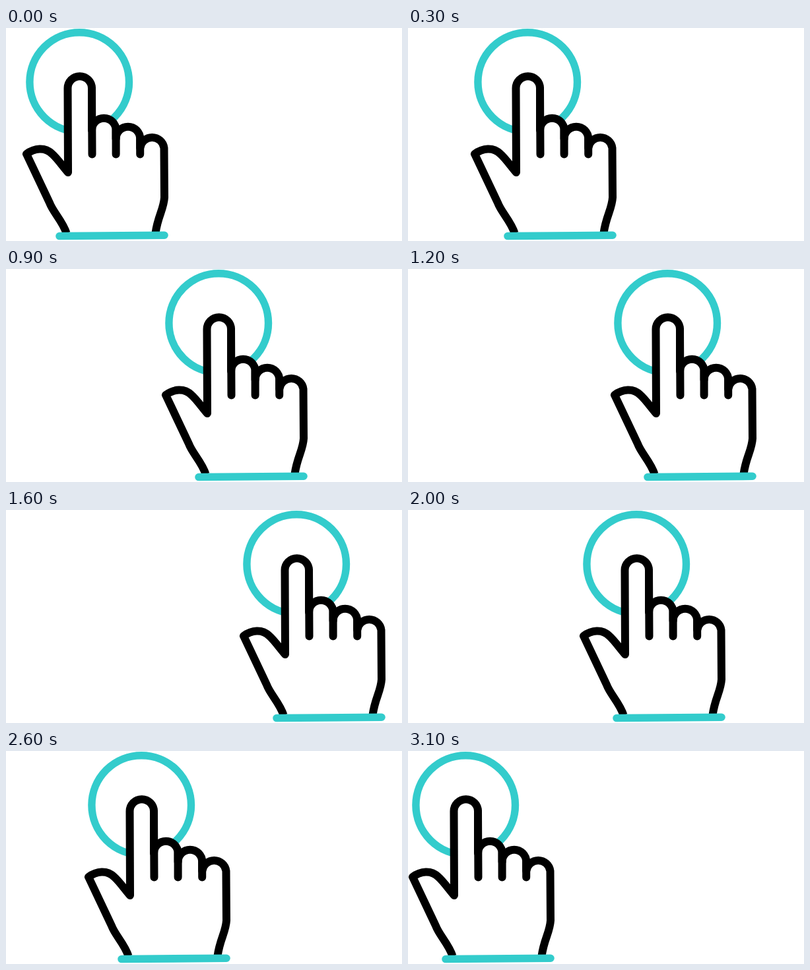
Animation, 600 px wide and 323 px high, one loop 3.2 s. Source, as an HTML page:

```html
<!DOCTYPE html>
<html lang="en">
<head>
<meta charset="utf-8">
<title>Sliding hand</title>
<style>
  html, body { margin: 0; width: 100%; height: 100%; overflow: hidden; background: #fff; }
  svg { display: block; width: 100%; height: 100%; }
</style>
</head>
<body>
<svg viewBox="0 0 600 323" fill="none" stroke-linejoin="round">
  <g id="hand">
    <circle cx="111.2" cy="82" r="75.3" stroke="#33cccc" stroke-width="11.4"/>
    <g stroke="#000" stroke-width="12">
      <path fill="#fff" d="M91.5 311C86 293 71 279 66 265L31 191C43 182 59 180 70 191
        C78 198 86 210 94 219L93.5 91.5A18.2 18.2 0 0 1 130 91.5V155
        A18.3 18.3 0 0 1 166.6 155V168A18.3 18.3 0 0 1 203.2 168V182
        A18.3 18.3 0 0 1 239.5 182L240 257C239 275 230 285 226.5 311"/>
      <path stroke-linecap="round" d="M130 91.5L130.5 191.5M166.6 155V191.5M203.2 168V191.5"/>
    </g>
    <path stroke="#33cccc" stroke-width="11.6" stroke-linecap="round" d="M81 315.5L240 314.3"/>
  </g>
</svg>
<script>
  const hand = document.getElementById('hand');
  const TICK = 100, TICKS = 32, STRIDE = 23.5, PEAK = 15;

  // Steady sweep right and back, moving once per tick.
  function draw(time) {
    const tick = Math.floor(time / TICK) % TICKS;
    const x = Math.floor((PEAK - Math.abs(tick - PEAK)) * STRIDE);
    hand.setAttribute('transform', `translate(${x} 0)`);
  }

  const start = performance.now();
  function loop() {
    draw(performance.now() - start);
    requestAnimationFrame(loop);
  }
  loop();
</script>
</body>
</html>
```
